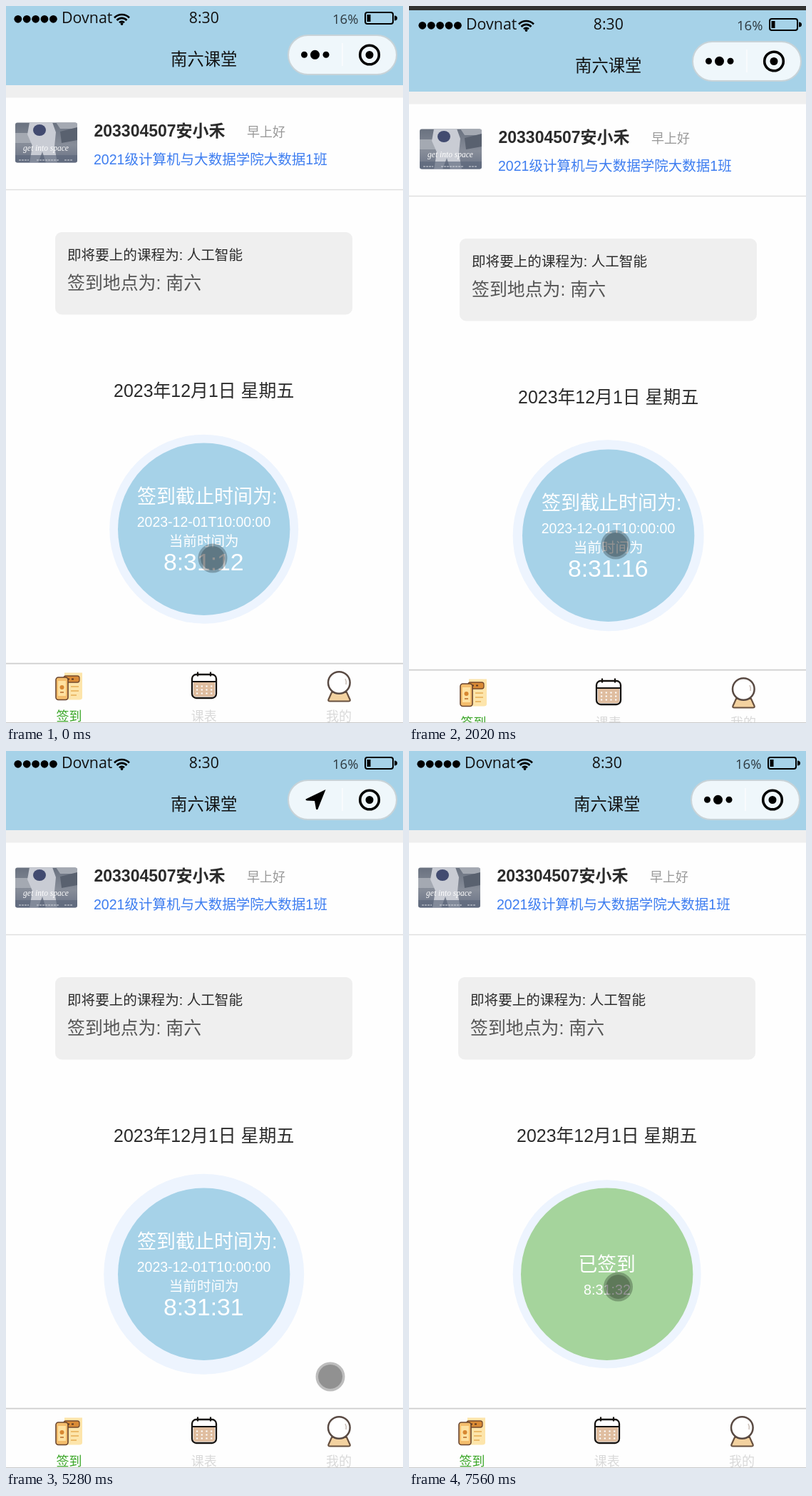
Animation, 557 px wide and 1005 px high, one loop 8000 ms. Source, as an HTML page:

```html
<!DOCTYPE html>
<html lang="zh-CN">
<head>
<meta charset="utf-8">
<title>签到</title>
<style>
html, body { margin: 0; width: 100%; height: 100%; overflow: hidden; background: #fefefe; }
svg { display: block; width: 100vw; height: 100vh; }
text { font-family: "Liberation Sans", "Noto Sans CJK SC", "Noto Sans CJK", sans-serif; white-space: pre; }
.ui { font-family: "Open Sans", "Noto Sans", sans-serif; }
.cjk { font-family: "Noto Sans CJK SC", "Noto Sans CJK", sans-serif; }
.mid { text-anchor: middle; }
</style>
</head>
<body>
<svg viewBox="0 0 557 1005" preserveAspectRatio="none">
  <defs>
    <clipPath id="view"><rect x="-5" y="111" width="570" height="810"/></clipPath>
    <clipPath id="frame"><rect x="13" y="163.5" width="87" height="56" rx="3"/></clipPath>
    <linearGradient id="tone" x2="0" y2="1">
      <stop offset="0" stop-color="#69717f"/><stop offset=".55" stop-color="#878d99"/><stop offset="1" stop-color="#687184"/>
    </linearGradient>
  </defs>
  <rect width="557" height="1005" fill="#323232"/>
  <g id="phone">
    <rect x="-5" y="-3" width="570" height="1015" fill="#fefefe"/>
    <g clip-path="url(#view)">
      <g id="page">
        <rect x="-5" y="100" width="570" height="28.5" fill="#efefef"/>
        <g clip-path="url(#frame)">
          <rect x="13" y="163" width="87" height="57" fill="url(#tone)"/>
          <path d="M13 178h22v14H13zM70 163h30v9H76z" fill="#a4a9b2"/>
          <path d="M33 163h32l5 14-2 20 4 23H56l-5-16-6 16H33l4-24-7-16z" fill="#c9ccd4"/>
          <path d="M76 176l24-6v18l-22 4z" fill="#59616f"/>
          <ellipse cx="47" cy="174" rx="9" ry="8" fill="#424b70"/>
          <path d="M13 209h87v11H13z" fill="#5d677c" opacity=".65"/>
          <text x="56" y="203" class="mid" font-size="11.5" font-style="italic" fill="#fff" style="font-family:'Liberation Serif',serif">get into space</text>
          <path d="M18 216h14M43 216h32M82 216h12" stroke="#d5d8df" stroke-dasharray="3 1"/>
        </g>
        <path d="M-5 257.5H565" stroke="#dedede" stroke-width="1.6"/>
        <rect x="69" y="317" width="417" height="115.5" rx="9" fill="#efefef"/>
        <text id="name" x="123.5" y="182.5" font-size="23" font-weight="bold" fill="#2b2b2b">203304507安小禾</text>
        <text id="hello" y="182.5" font-size="18" fill="#999">早上好</text>
        <text id="group" x="123" font-size="19.55" fill="#3d7df0"></text>
        <text id="course" x="86" y="355.5" font-size="19.6" fill="#2b2b2b"></text>
        <text id="place" x="86" y="396.5" font-size="24.9" fill="#555"></text>
        <text x="277.7" y="548" class="mid" font-size="24.9" fill="#2b2b2b">2023年12月1日 星期五</text>
        <circle id="halo" cx="277.7" cy="733.2" fill="#edf4fe"/>
        <circle id="disc" cx="277.7" cy="733.2" r="120.7"/>
        <g fill="#fff" class="mid">
          <g id="pending">
            <text x="282.3" y="697" font-size="27">签到截止时间为:</text>
            <text x="277.5" y="730" font-size="19.5">2023-12-01T10:00:00</text>
            <text x="277.7" y="756.5" font-size="19.6">当前时间为</text>
          </g>
          <g id="empty">
            <text x="275" y="714.5" font-size="19.6">暂无签到</text>
            <text x="277.7" y="740.5" font-size="19.6">当前的时间为:</text>
          </g>
          <text id="clock" x="277.3" font-size="33.8"></text>
          <g id="done">
            <text x="277.7" y="729" font-size="26.8">已签到</text>
            <text x="278" y="762" font-size="19.8">8:31:32</text>
          </g>
        </g>
        <path d="M76 950.5c-4-6-9.5-11-9.5-16.5a9.5 9.5 0 0 1 19 0c0 5.5-5.5 10.5-9.5 16.5z" fill="#327df0"/>
        <circle cx="76" cy="934" r="3.6" fill="#fff"/>
        <text x="96" y="946" class="cjk" font-size="21.35" fill="#2b2b2b">云岭省青禾市望溪县松桥路青禾市望溪…</text>
        <text x="277.7" y="1016" class="mid" font-size="19.6" fill="#3d7df0">刷新位置</text>
      </g>
    </g>

    <rect x="-5" y="-3" width="570" height="114" fill="#a6d2e8"/>
    <g id="signal"></g>
    <text x="78" y="24" class="ui" font-size="21.4" fill="#111">Dovnat</text>
    <path d="M152 16.5a14.5 14.5 0 0 1 21 0M155.5 20a9.5 9.5 0 0 1 14 0M159 23.3a5 5 0 0 1 7 0" fill="none" stroke="#000" stroke-width="2.6"/>
    <circle cx="162.5" cy="25" r="1.9"/>
    <text x="277.8" y="24" class="ui mid" font-size="21.2" fill="#111">8:30</text>
    <text x="458" y="25" class="ui" font-size="18.5" fill="#2d383e">16%</text>
    <rect x="504" y="9" width="39" height="16" rx="3" fill="none" stroke="#000" stroke-width="2"/>
    <path d="M506.5 12h5v10h-5zM545 13.5q4 0 4 3.5t-4 3.5z"/>
    <text x="277.7" y="82.5" class="mid" font-size="23.3" fill="#111">南六课堂</text>
    <rect x="396" y="41" width="152" height="55" rx="27.5" fill="#eff7fb" stroke="#c8d3d8" stroke-width="2"/>
    <path d="M472 52V84" stroke="#fbfdfe" stroke-width="1.5"/>
    <g id="dots">
      <circle cx="418.5" cy="68.3" r="4.5"/><circle cx="433.5" cy="68.3" r="6.5"/><circle cx="449" cy="68.3" r="4.5"/>
    </g>
    <path id="arrow" d="M448.5 54L420.5 67.5Q420 69 422 69.5L433 70 435 81.5Q436.500 83 437.5 81.5z"/>
    <circle cx="510" cy="68.5" r="13.3" fill="none" stroke="#000" stroke-width="3.6"/>
    <circle cx="510" cy="68.5" r="5.5"/>

    <rect x="-5" y="921" width="570" height="100" fill="#fefefe"/>
    <path d="M-5 921.6H565" stroke="#cecece" stroke-width="1.7"/>
    <g>
      <path d="M82 934.5h25v35q0 3-4 3H82z" fill="#fde5ab"/>
      <rect x="81" y="939" width="22" height="9" rx="3" fill="#d98a35" stroke="#74492d" stroke-width="1.3"/>
      <path d="M86 943.5h3m3 0h3" stroke="#5d3823" stroke-width="2"/>
      <path d="M91 954h11M91 960h11M91 966h8" stroke="#e6ad54" stroke-width="1.7"/>
      <rect x="70" y="941" width="17" height="31.5" rx="3.5" fill="#f4bd6c" stroke="#69452f" stroke-width="1.6"/>
      <rect x="73" y="946" width="11" height="21" fill="#fee1a0"/>
      <circle cx="78.5" cy="955" r="3" fill="#d78731"/>
      <path d="M76 962h5" stroke="#b66c2d" stroke-width="1.5"/>
    </g>
    <rect x="261" y="937" width="34" height="33" rx="6" fill="#fff" stroke="#15120f" stroke-width="2.3"/>
    <path d="M263 948h30v17q0 3-3 3h-24q-3 0-3-3z" fill="#dfbd9f"/>
    <path d="M261 947h34M269 933.5v6M287 933.5v6" stroke="#15120f" stroke-width="2.2"/>
    <path d="M267 953.5h23M267 958.5h23M267 963.5h23" stroke="#fff" stroke-width="2" stroke-dasharray="2.2 4.5"/>
    <path d="M457 962h21l4.5 10q1 2.5-2 2.5h-26q-3 0-2-2.5z" fill="#f3d2a0" stroke="#67503f" stroke-width="2.2"/>
    <circle cx="467.3" cy="948.5" r="15.3" fill="#fff" stroke="#594a43" stroke-width="2.5"/>
    <path d="M476 943a11 11 0 0 1 1 8" fill="none" stroke="#c9bdb5" stroke-width="1.5"/>
    <g class="mid" font-size="18" fill="#d9d9d9">
      <text x="88.5" y="1001.5" fill="#3ba628">签到</text>
      <text x="277.7" y="1001.5">课表</text>
      <text x="467" y="1001.5">我的</text>
    </g>
  </g>
  <path d="M0 1004.5H557" stroke="#c9c9c9"/>
  <g id="cursor">
    <circle r="18.7" fill="none" stroke="#000" stroke-opacity=".26" stroke-width="3.6"/>
    <circle r="17" fill="#000" fill-opacity=".43"/>
  </g>
</svg>
<script>
const LOOP = 8000, RELOAD = 2500, LOADED = 3250, SIGNED = 7270;
const $ = id => document.getElementById(id);
const show = (id, on) => $(id).setAttribute("visibility", on ? "visible" : "hidden");
const set = (id, attrs) => { for (const k in attrs) $(id).setAttribute(k, attrs[k]); };
const within = (t, a, b) => t >= a && t < b;
const clamp = x => Math.max(0, Math.min(1, x));

const scrolls = [[0, 0], [200, -36], [290, -84], [370, -117], [460, -132], [1090, -98], [1175, -40], [1260, 0]];
const seconds = [[0, 12], [200, 13], [820, 14], [1540, 15], [1990, 16], [RELOAD, 28], [3300, 29], [4100, 30], [4900, 31], [5950, 32]];
const pointer = [[0, 290, 774], [1540, 290, 755], [RELOAD, -99, -99], [5200, 517, 919], [5280, 455, 877], [5375, 380, 842],
  [5470, 321.5, 805.5], [5670, 314, 785], [5750, 306.5, 764.5], [5950, 300, 758], [6040, 293.5, 751]];
const haloSizes = [[0, 132.5], [820, 136], [2020, 134], [2960, 144], [5280, 140.5], [6610, 131.5], [7560, 132], [LOOP, 132.5]];

const held = (keys, t) => keys.filter(k => k[0] <= t).pop();
function between(keys, t) {
  const i = keys.findIndex(k => k[0] > t);
  const [a, from] = keys[i - 1], [b, to] = keys[i];
  return from + (to - from) * (t - a) / (b - a);
}

$("signal").innerHTML = [0, 1, 2, 3, 4].map(i => `<circle cx="${16.8 + 12.4 * i}" cy="18.3" r="5.4"/>`).join("");

function draw(t) {
  const blank = within(t, RELOAD, LOADED);
  const shifted = within(t, 1730, RELOAD) || within(t, 6410, 7160);
  const located = within(t, 2960, 5470);
  const signed = clamp((t - SIGNED + 90) / 380) * (t >= SIGNED);

  set("phone", { transform: shifted ? "translate(2 9)" : "" });
  set("page", { transform: `translate(0 ${held(scrolls, t)[1]})` });

  show("name", !blank);
  set("hello", { x: blank ? 153 : 338, y: blank ? 180.5 : 182.5 });
  set("group", { y: blank ? 219.5 : 221.5 });
  $("group").textContent = blank ? "级班" : "2021级计算机与大数据学院大数据1班";
  $("course").textContent = blank ? "暂无课程" : "即将要上的课程为: 人工智能";
  $("place").textContent = blank ? "暂无签到地址" : "签到地点为: 南六";

  const mix = [[166, 165], [210, 212], [232, 156]].map(([a, b]) => Math.round(a + (b - a) * signed));
  set("halo", { r: between(haloSizes, t) });
  set("disc", { fill: `rgb(${mix})` });
  show("empty", blank);
  show("pending", !blank);
  set("pending", { opacity: 1 - signed });
  set("clock", { y: blank ? 775.5 : 791, opacity: 1 - signed });
  set("done", { opacity: signed });
  $("clock").textContent = "8:31:" + held(seconds, t)[1];

  show("dots", !located);
  show("arrow", located);
  set("arrow", { opacity: 0.55 + 0.45 * Math.cos((t - 2960) / 1160 * 2 * Math.PI) });

  const [, x, y] = held(pointer, t);
  set("cursor", { transform: `translate(${x} ${y})` });
}

const start = performance.now();
function tick() {
  draw((performance.now() - start) % LOOP);
  requestAnimationFrame(tick);
}
tick();
</script>
</body>
</html>
```
